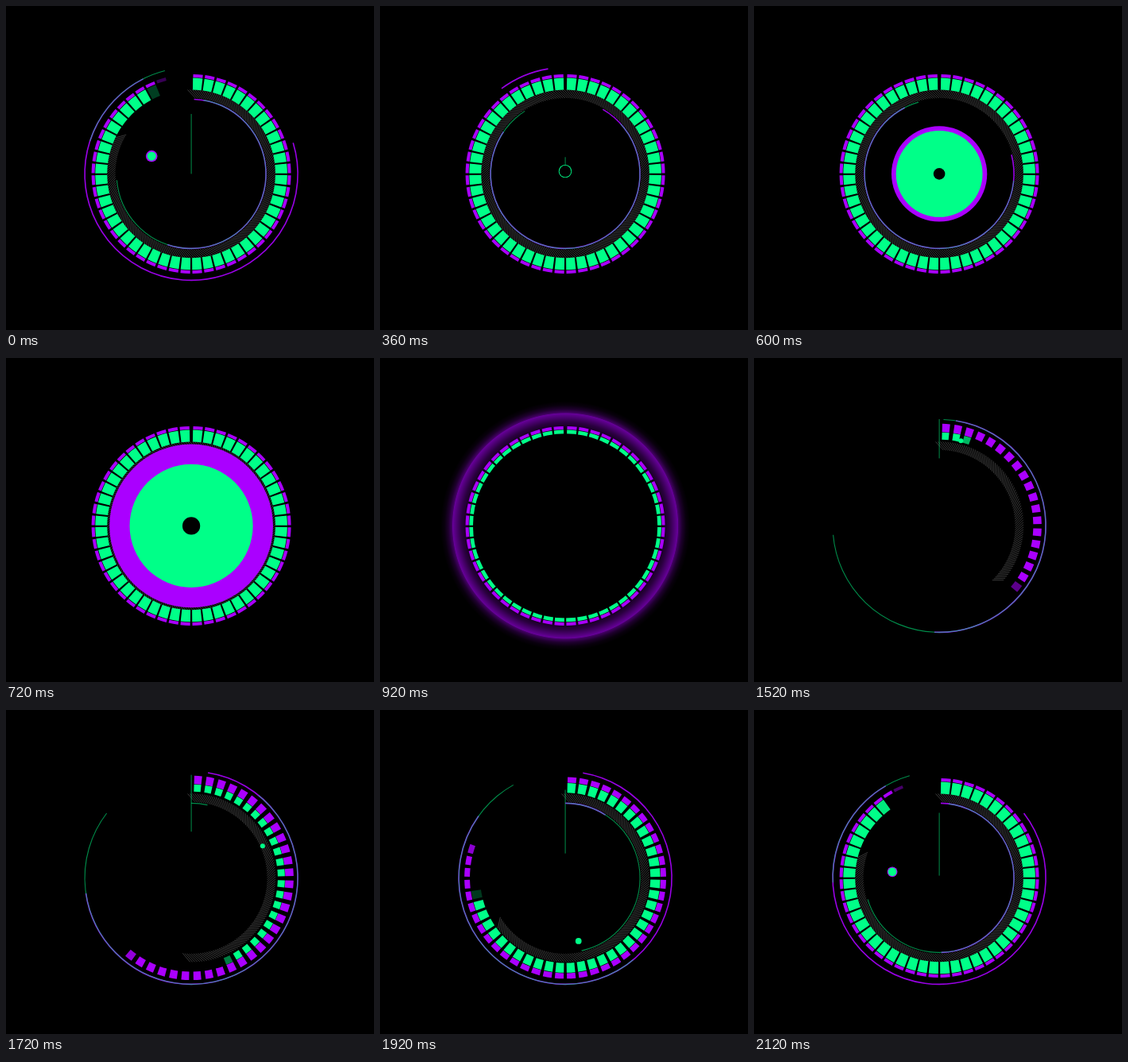
Write an HTML page with a canvas that moves like this. It is 463 px wide and 408 px high and loops after 2.22 s.

```html
<!DOCTYPE html>
<html lang="en">
<head>
<meta charset="utf-8">
<title>Radial loop</title>
<style>
  html, body { margin: 0; width: 100%; height: 100%; overflow: hidden; background: #000; }
  canvas { display: block; }
</style>
</head>
<body>
<canvas id="stage" width="463" height="408"></canvas>
<script>
const ctx = document.getElementById('stage').getContext('2d');
const CX = 233.1, CY = 211.4, TAU = Math.PI * 2;
const GREEN = '#00ff88', PURPLE = '#aa00ff';
const LOOP = 2220, STEP = 40, COUNT = 54, FIRST = 28;
const SEGMENTS = 52, PITCH = 6.906, HATCHES = 220, RATE = 0.118;

// Easing; u counts steps of 40 ms and one cycle runs from 28 to 82.
const ramp = (u, a, b) => Math.min(1, Math.max(0, (u - a) / (b - a)));
const mix = (a, b, s) => a + (b - a) * s;
const settle = (u, start) => 1 - Math.exp(-RATE * Math.max(0, u - start));
const quadOut = (u, a, b) => 1 - (1 - ramp(u, a, b)) ** 2;
function swing(u, a, b, power = 2) {
  const s = ramp(u, a, b), p = s ** power;
  return p / (p + (1 - s) ** power);
}

const rad = deg => (deg - 90) * Math.PI / 180;
const polar = (r, deg) => [CX + r * Math.cos(rad(deg)), CY + r * Math.sin(rad(deg))];

function arc(radius, from, to, color, width, alpha = 1) {
  if (to - from < 0.05) return;
  ctx.globalAlpha = alpha;
  ctx.strokeStyle = color;
  ctx.lineWidth = width;
  ctx.beginPath();
  ctx.arc(CX, CY, radius, rad(from), rad(to));
  ctx.stroke();
  ctx.globalAlpha = 1;
}

function disc(x, y, r, fill) {
  if (r <= 0) return;
  ctx.fillStyle = fill;
  ctx.beginPath();
  ctx.arc(x, y, r, 0, TAU);
  ctx.fill();
}

function outerLine(u) {
  arc(134, mix(9, 360, swing(u, 47.2, 68.4)), 360 * settle(u, 32), PURPLE, 1.6, 0.9);
  arc(134, 360 * swing(u, 36, 63), 360 * settle(u, 26.7), GREEN, 1.1, 0.55);
}

function innerLine(u) {
  arc(94, 360 * swing(u, 50, 106), 360 * settle(u, 47.2), PURPLE, 1.6, 0.9);
  arc(94, 360 * swing(u, 45, 109), 360 * settle(u, 42.7), GREEN, 1.1, 0.55);
}

function hatching(u) {
  const shown = HATCHES * ramp(u, 25.1, 60);
  ctx.strokeStyle = '#4a4a4a';
  ctx.lineWidth = 0.8;
  ctx.beginPath();
  for (let k = 0; k < shown; k++) {
    const a = k * 360 / HATCHES;
    ctx.moveTo(...polar(106, a - 2.5));
    ctx.lineTo(...polar(95.5, a + 3.2));
  }
  ctx.stroke();
}

function segments(radius, width, count, dash, color) {
  for (let k = 0; k < count; k++) {
    const mid = 3.9 + k * PITCH;
    arc(radius, mid - dash / 2, mid + dash / 2, color, width, Math.min(1, count - k));
  }
}

function ring(u) {
  const grow = ramp(u, 43, 52);
  segments(123.5, mix(10.5, 4, grow), SEGMENTS * quadOut(u, 32.5, 60.3), mix(4.4, 5.6, grow), PURPLE);
  segments(113.3, mix(9, 15, grow), SEGMENTS * quadOut(u, 37.4, 60.1), mix(4.4, 5.8, grow), GREEN);
}

function stem(u) {
  const from = mix(77, CY, swing(u, 40, 70.5, 1.5));
  const to = mix(77, CY, ramp(u, 28, 53.5) ** 1.07);
  if (to <= from) return;
  ctx.globalAlpha = 0.55;
  ctx.fillStyle = GREEN;
  ctx.fillRect(CX - 0.5, from, 1, to - from);
  ctx.globalAlpha = 1;
}

// The purple disc hollows out into a glowing rim.
function burst(r, u) {
  const hollow = ramp(u, 72, 77), fade = 1 - ramp(u, 77, 82), size = r + 15;
  const core = 1 - hollow, edge = 1 - 0.4 * hollow;
  const g = ctx.createRadialGradient(CX, CY, 0, CX, CY, size);
  const at = (radius, a) => g.addColorStop(radius / size, `rgba(170,0,255,${(a * fade).toFixed(3)})`);
  at(0, core);
  at(r * 0.83, core);
  at(r * 0.92, mix(core, edge, 0.42));
  at(r - 0.4, edge);
  at(r + 0.4, 0.4 * hollow);
  at(r + 5, 0.18 * hollow);
  at(r + 10, 0.05 * hollow);
  at(size, 0);
  disc(CX, CY, size, g);
}

function draw(u) {
  ctx.fillStyle = '#000';
  ctx.fillRect(0, 0, 463, 408);

  // The dot spirals in, then bursts as purple, green and black discs.
  const [x, y] = polar(118 * (1 - ramp(u, 31, 63.5) ** 1.8), 360 * swing(u, 31, 66, 2.3));
  const purple = 7.3 * ramp(u, 46, 54) + 134.7 * swing(u, 63, 77, 1.52);
  const green = 3 * ramp(u, 28, 31) + 5.2 * ramp(u, 45, 63) + 104 * ramp(u, 63, 76.5);
  const black = 7.3 * ramp(u, 57, 63) + 159 * swing(u, 70, 82, 2.3);

  if (purple < 107) {
    hatching(u);
    innerLine(u);
  }
  outerLine(u);
  stem(u);

  if (u > 72) burst(purple, u);
  else disc(x, y, purple, PURPLE);
  ring(u);
  disc(x, y, green, GREEN);
  disc(x, y, black, '#000');
}

const start = performance.now();
function tick() {
  const t = (performance.now() - start) % LOOP;
  const n = Math.min(COUNT - 1, Math.floor(t / STEP));
  draw(n < FIRST ? n + COUNT : n);
  requestAnimationFrame(tick);
}
tick();
</script>
</body>
</html>
```
